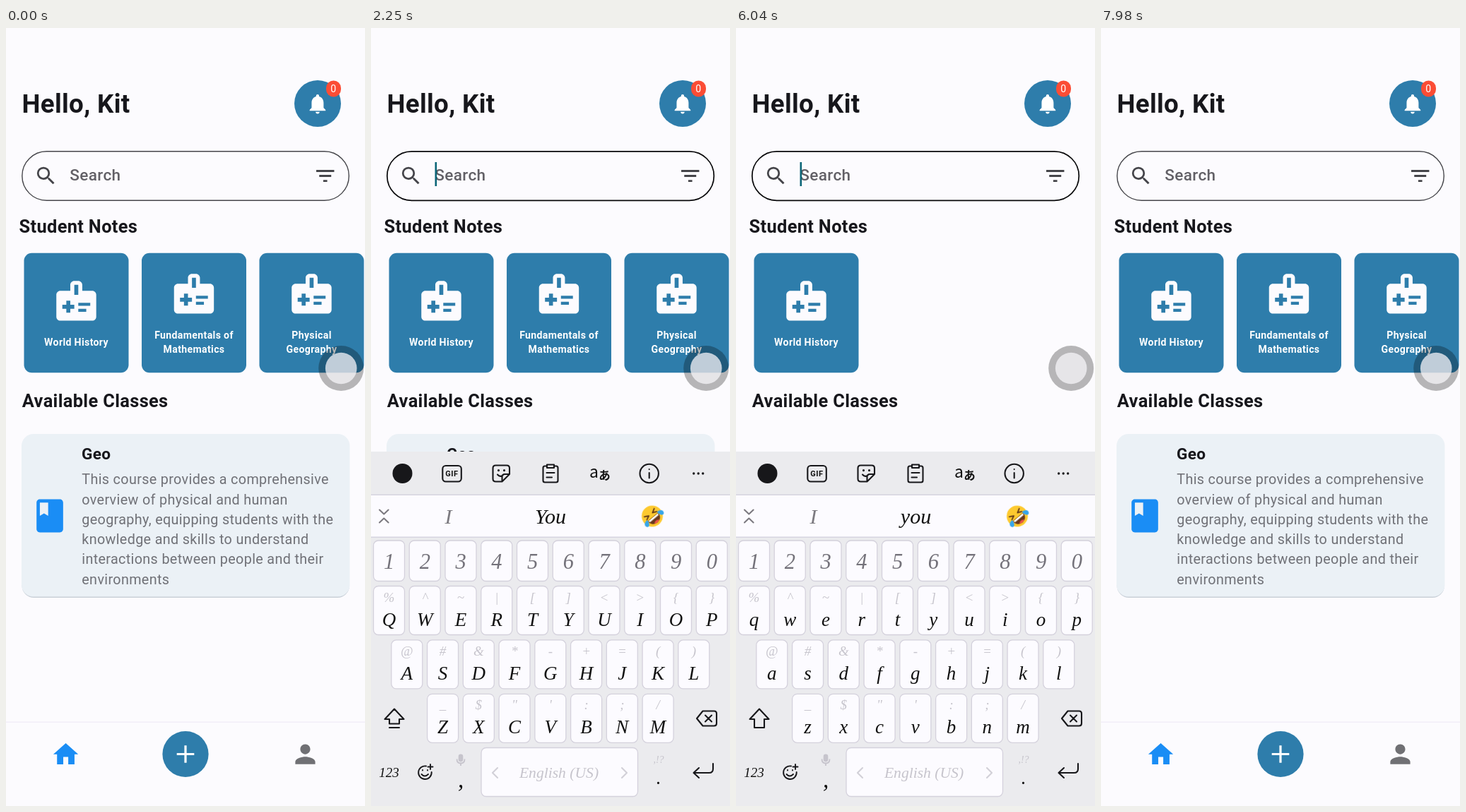
These frames come from a looping animation (508x1102 px, 8 s). An HTML page:

```html
<!DOCTYPE html>
<html lang="en">
<head>
<meta charset="utf-8">
<title>Class search</title>
<style>
html, body { margin: 0; width: 100%; height: 100%; overflow: hidden; background: #fcfbfe; }
svg { display: block; width: 100%; height: 100%; }
text { font-family: Roboto, sans-serif; letter-spacing: .35px; white-space: pre; }
.bold { font-weight: 700; fill: #17171c; }
.h2 { font-size: 25.4px; }
.input { font-size: 22.6px; }
.holder { font-weight: 500; fill: #626066; }
.label { font-size: 14.1px; font-weight: 700; fill: #fff; text-anchor: middle; }
.desc { font-size: 19.75px; fill: #707177; }
.kb text { font-family: "Liberation Serif", "Noto Serif", serif; font-style: italic; letter-spacing: 0; text-anchor: middle; fill: #111; }
.kb .num { font-size: 30.5px; fill: #74727a; }
.kb .key { font-size: 27px; }
.kb .hint { font-size: 19px; fill: #c6c4cc; }
.kb .sug { font-size: 30px; fill: #111; }
.kb .dim { fill: #7c7a80; }
.kb .glyph { font-family: "Noto Sans CJK JP", "Noto Sans CJK", "Noto Sans", sans-serif; font-style: normal; font-weight: 500; }
.line { fill: none; stroke: #17171a; stroke-width: 2.1; stroke-linecap: round; stroke-linejoin: round; }
.cap { fill: #fcfbff; stroke: #d4d1dc; stroke-width: 1.3; }

.steps { animation: 8s step-end infinite; }
.idle { animation-name: idle; }
.focus { animation-name: focus; }
.page { animation-name: page; }
.unfiltered { animation-name: unfiltered; }
.typed { animation-name: typed; }
.empty { animation-name: empty; }
.upper { animation-name: upper; }
.lower { animation-name: lower; }
.sug-low { animation-name: sugLow; }
.cover { animation-name: cover; }
.load { animation-name: load; }
.shift { animation-name: shift; }
.blink { animation: blink 1s -20ms step-end infinite; }
.kb { animation: slide 8s infinite, fade 8s infinite; }
.arc { transform-origin: 254px 512.5px; animation: turn 8s linear infinite, sweep 8s infinite; }

@keyframes idle { 0%, 77.4375% { opacity: 1 } 12.125% { opacity: 0 } 100% { opacity: 1 } }
@keyframes focus { 0%, 77.4375%, 100% { opacity: 0 } 12.125% { opacity: 1 } }
@keyframes page { 0%, 86%, 100% { opacity: 1 } 77.4375% { opacity: 0 } }
@keyframes load { 0%, 86%, 100% { opacity: 0 } 77.4375% { opacity: 1 } }
@keyframes unfiltered { 0%, 86%, 100% { opacity: 1 } 31.25% { opacity: 0 } }
@keyframes typed { 0%, 69.5%, 100% { opacity: 0 } 31.25% { opacity: 1 } }
@keyframes empty { 0%, 69.5%, 100% { opacity: 1 } 31.25% { opacity: 0 } }
@keyframes upper { 0%, 31.25%, 100% { opacity: 0 } 25.25% { opacity: 1 } }
@keyframes lower { 0%, 31.25%, 100% { opacity: 1 } 25.25% { opacity: 0 } }
@keyframes sugLow { 0%, 69.5%, 100% { opacity: 1 } 25.25% { opacity: 0 } }
@keyframes cover { 0%, 75.75%, 100% { opacity: 0 } 17.25% { opacity: 1 } }
@keyframes shift { 0%, 69.5%, 100% { transform: none } 31.25% { transform: translateX(21px) } }
@keyframes blink { 0%, 100% { opacity: 1 } 50% { opacity: 0 } }
@keyframes slide {
  0%, 78.25%, 100% { transform: translateY(107px) }
  17.25% { transform: translateY(107px); animation-timing-function: cubic-bezier(0, 0, .2, 1) }
  19.75% { transform: none }
  75.75% { transform: none; animation-timing-function: cubic-bezier(.4, 0, 1, 1) }
}
@keyframes fade {
  0%, 78.25%, 100% { opacity: 0 }
  17.25% { opacity: 0; animation-timing-function: linear }
  18.5% { opacity: 1 }
  75.75% { opacity: 1; animation-timing-function: cubic-bezier(.4, 0, 1, 1) }
}
@keyframes turn { 0%, 77.4375% { transform: rotate(-90deg) } 83.75%, 100% { transform: rotate(26deg) } }
@keyframes sweep {
  0%, 77.4375% { stroke-dasharray: .5 400; animation-timing-function: cubic-bezier(.45, 0, .4, 1) }
  83.75%, 100% { stroke-dasharray: 260 400 }
}
</style>
</head>
<body>
<svg viewBox="0 0 508 1102" preserveAspectRatio="none">
  <defs>
    <path id="badge" fill-rule="evenodd" d="M20 7h-5V4c0-1.1-.9-2-2-2h-2c-1.1 0-2 .9-2 2v3H4c-1.1 0-2 .9-2 2v11c0 1.1.9 2 2 2h16c1.1 0 2-.9 2-2V9c0-1.1-.9-2-2-2zm-9-3h2v5h-2V4zm0 12H9v2H7v-2H5v-2h2v-2h2v2h2v2zm2-1.5V13h6v1.5h-6zm0 3V16h4v1.5h-4z"/>
    <g id="rofl" transform="rotate(-40)">
      <circle r="15" fill="#fdc92f"/>
      <path d="M-9.5 1.5H9.5C9.5 8 5.5 11.5 0 11.5S-9.5 8-9.5 1.5z" fill="#6b3a1c"/>
      <path d="M-8.5 2H8.5L8 4.5H-8z" fill="#fff"/>
      <path d="M-4.5 10C-2 7.5 2 7.5 4.5 10 2 11.8-2 11.8-4.5 10z" fill="#f0524a"/>
      <path d="M-9-6.5L-3.5-3.5-9-1M9-6.5L3.5-3.5 9-1" fill="none" stroke="#5a3218" stroke-width="1.8" stroke-linecap="round" stroke-linejoin="round"/>
      <path d="M-9 0C-15-1-18 4-15.5 7S-9 6-9 0zM9 0C15-1 18 4 15.5 7S9 6 9 0z" fill="#36a5ea"/>
    </g>
  </defs>

  <rect width="508" height="1102" fill="#fcfbfe"/>

  <g class="steps page">
    <text class="bold" x="22.5" y="120" font-size="36.7">Hello, Kit</text>
    <circle cx="441" cy="107" r="33" fill="#2e7dab"/>
    <path fill="#fff" transform="translate(424 90.5) scale(1.411)" d="M12 22c1.1 0 2-.9 2-2h-4c0 1.1.89 2 2 2zm6-6v-5c0-3.07-1.64-5.64-4.5-6.32V4c0-.83-.67-1.5-1.5-1.5s-1.5.67-1.5 1.5v.68C7.63 5.36 6 7.92 6 11v5l-2 2v1h16v-1l-2-2z"/>
    <rect x="453" y="74.5" width="21" height="23" rx="10.5" fill="#fb4d35"/>
    <text x="463.5" y="91" font-size="14.1" fill="#fff" text-anchor="middle">0</text>

    <rect class="steps idle" x="22.8" y="174.8" width="462.5" height="69.5" rx="34.75" fill="none" stroke="#45454a" stroke-width="1.4"/>
    <rect class="steps focus" x="22.8" y="174.8" width="462.5" height="69.5" rx="34.75" fill="none" stroke="#08080a" stroke-width="1.7"/>
    <g fill="#45454a">
      <path transform="translate(39.6 192.4) scale(1.411)" d="M15.5 14h-.79l-.28-.27A6.471 6.471 0 0 0 16 9.5 6.5 6.5 0 1 0 9.5 16c1.61 0 3.09-.59 4.23-1.57l.27.28v.79l5 4.99L20.49 19l-4.99-5zm-6 0C7.01 14 5 11.99 5 9.5S7.01 5 9.5 5 14 7.01 14 9.5 11.99 14 9.5 14z"/>
      <path transform="translate(434.8 192.6) scale(1.411)" d="M10 18h4v-2h-4v2zM3 6v2h18V6H3zm3 7h12v-2H6v2z"/>
    </g>
    <text class="input holder steps empty" x="90.3" y="216.3">Search</text>
    <g class="steps typed">
      <text class="input" x="91" y="216.5" fill="#1d1d22">W</text>
      <rect x="91" y="218.5" width="20.5" height="1.5" fill="#1d1d22"/>
    </g>
    <g class="steps focus"><g class="steps shift"><rect class="blink" x="90.5" y="190" width="2.6" height="34" fill="#0a6577"/></g></g>

    <text class="bold h2" x="18.5" y="290">Student Notes</text>
    <g id="cards"></g>
    <text class="bold h2" x="22.8" y="537">Available Classes</text>

    <g class="steps unfiltered">
      <rect x="22.5" y="577" width="463.5" height="230" rx="17" fill="#c9d0d8"/>
      <rect x="22" y="575" width="464.5" height="230.5" rx="17" fill="#ebf1f6"/>
      <path fill="#1a8df5" fill-rule="evenodd" transform="translate(33.8 662.8) scale(2.352)" d="M18 2H6c-1.1 0-2 .9-2 2v16c0 1.1.9 2 2 2h12c1.1 0 2-.9 2-2V4c0-1.1-.9-2-2-2zM6 4h5v8l-2.5-1.5L6 12V4z"/>
      <text class="bold" x="107" y="611" font-size="22.6">Geo</text>
      <g id="desc"></g>
    </g>
  </g>

  <g class="steps load">
    <circle class="arc" cx="254" cy="512.5" r="25.2" pathLength="360" fill="none" stroke="#086377" stroke-width="5.6" stroke-linecap="square"/>
  </g>

  <rect class="steps cover" y="600" width="508" height="383" fill="#fcfbfe"/>

  <rect y="982.5" width="508" height="1.3" fill="#efecf7"/>
  <path fill="#1a8df5" transform="translate(63.4 1007.7) scale(1.764)" d="M10 20v-6h4v6h5v-8h3L12 3 2 12h3v8z"/>
  <circle cx="254" cy="1028.5" r="32.6" fill="#2e7dab"/>
  <path d="M241.7 1028.5h24.6M254 1016.2v24.6" stroke="#fff" stroke-width="3.2"/>
  <path fill="#707074" transform="translate(402.3 1007.5) scale(1.764)" d="M12 12c2.21 0 4-1.79 4-4s-1.79-4-4-4-4 1.79-4 4 1.79 4 4 4zm0 2c-2.67 0-8 1.34-8 4v2h16v-2c0-2.66-5.33-4-8-4z"/>

  <circle cx="474.2" cy="482" r="32" fill="#000" fill-opacity=".28"/>
  <circle cx="474.2" cy="482" r="22.3" fill="#f6f5f8" fill-opacity=".75"/>

  <g class="kb">
    <rect y="600" width="508" height="615" fill="#ebebee"/>
    <rect y="661" width="508" height="60" fill="#fcfbff"/>
    <path d="M0 661.2H508M0 721.2H508" stroke="#d6d4e0" stroke-width="1.4"/>

    <!-- toolbar -->
    <circle cx="44.5" cy="631" r="14" fill="#17171a"/>
    <rect class="line" x="101.3" y="620" width="26.5" height="22.5" rx="4.5"/>
    <text class="glyph" x="114.5" y="635.3" style="font-family:Roboto,sans-serif;font-size:11px;font-weight:700;letter-spacing:.6px">GIF</text>
    <path class="line" d="M176.5 619.5h15.5q4 0 4 4V632l-10.5 10.5h-9q-4 0-4-4v-15q0-4 4-4zM196 632h-6.5q-4 0-4 4v6.5M179 632.5q4 4.5 8 .5"/>
    <path class="line" style="stroke-width:3.2" d="M180.5 626.5v.1M188.5 626.5v.1"/>
    <path class="line" d="M249 620.5h-3q-2.5 0-2.5 2.5v18q0 2.5 2.5 2.5h16q2.5 0 2.5-2.5V623q0-2.5-2.5-2.5h-3M249 618.5h10v4.500h-10zM248.500 630h11M248.500 636.500h7.500"/>
    <text class="glyph" x="315.5" y="637" font-size="23">a</text>
    <text class="glyph" x="330.5" y="639.5" font-size="16.5" style="font-weight:700">あ</text>
    <circle class="line" cx="393.7" cy="631" r="13.2"/>
    <path class="line" d="M393.7 630v7.5M393.7 625v.1"/>
    <path class="line" style="stroke-width:3.4" d="M456.7 631v.1M463.2 631v.1M469.7 631v.1"/>

    <!-- suggestions -->
    <path class="line" style="stroke:#7c7a80" d="M12 682.5l6.3 6 6.3-6M12 700.5l6.3-6 6.3 6"/>
    <g class="steps empty">
      <text class="sug dim" x="109.5" y="702">I</text>
      <g transform="translate(398 691.5)"><use href="#rofl"/></g>
    </g>
    <text class="sug steps sug-low" x="254.5" y="702">you</text>
    <text class="sug steps upper" x="254" y="702">You</text>
    <g class="steps typed">
      <text class="sug dim" x="109" y="702">What</text>
      <text class="sug" x="253" y="702">W</text>
      <text class="sug dim" x="398" y="702">We</text>
    </g>

    <g id="keys"></g>

    <!-- function keys -->
    <path class="line steps lower" d="M33 964.5l-13.5 14.5h6.5v12h14v-12h6.5z"/>
    <path class="line steps upper" d="M33 964.5l-13.5 14.5h6.5v6.5h14v-6.500h6.500zM26 991h14"/>
    <path class="line" d="M469.500 967.500h16q3.500 0 3.500 3.500v14q0 3.500-3.500 3.500h-16l-8.500-10.500zM473 973.500l9 9M482 973.500l-9 9"/>
    <text x="25.5" y="1061" font-size="19">123</text>
    <path class="line" style="stroke-width:1.9" d="M78 1045.5a9.3 9.3 0 1 0 7.7 8.5M71.5 1057q4.5 5 9.5 0M73 1051v.6M80 1051v.6M84 1043v7M80.5 1046.5h7"/>
    <g fill="none" stroke="#c6c4cc" stroke-width="1.8">
      <rect x="124.6" y="1029.5" width="4.8" height="9" rx="2.4" fill="#c6c4cc"/>
      <path d="M121.5 1035.5q0 6 5.5 6t5.5-6M127 1041.5v3.5"/>
    </g>
    <text class="key" x="127" y="1076" style="font-size:33px">,</text>
    <text class="hint" x="407" y="1041" style="font-size:14px">,!?</text>
    <text class="key" x="407" y="1071">.</text>
    <path class="line" d="M484 1042v7.500q0 5.500-5.500 5.500H457M464 1048l-7.500 7 7.500 7"/>
    <rect class="cap" x="156" y="1019.5" width="221.5" height="69" rx="7"/>
    <text class="hint" x="266" y="1062" style="font-size:21.6px">English (US)</text>
    <path class="line" style="stroke:#d2d0d8" d="M179 1048l-7 7 7 7M355 1048l7 7-7 7"/>
  </g>
</svg>
<script>
const $ = id => document.getElementById(id);
const esc = s => s.replace(/&/g, '&amp;').replace(/</g, '&lt;');
const text = (cls, x, y, s) => `<text class="${cls}" x="${x}" y="${y}">${esc(s)}</text>`;

const notes = [['World History'], ['Fundamentals of', 'Mathematics'], ['Physical', 'Geography']];
$('cards').innerHTML = notes.map((lines, i) => {
  const x = 25.5 + i * 166.5, mid = x + 74, up = (lines.length - 1) * 10;
  return `<g class="${i ? 'steps unfiltered' : ''}">
    <rect x="${x}" y="318.7" width="148" height="169.5" rx="11" fill="#2e7dab"/>
    <use href="#badge" fill="#fcfbfe" transform="translate(${mid - 33.9} ${352.5 - up}) scale(2.822)"/>
    ${lines.map((s, n) => text('label', mid, 450 - up + n * 20, s)).join('')}</g>`;
}).join('');

$('desc').innerHTML = [
  'This course provides a comprehensive',
  'overview of physical and human',
  'geography, equipping students with the',
  'knowledge and skills to understand',
  'interactions between people and their',
  'environments'
].map((s, i) => text('desc', 107.3, 646.3 + i * 28.25, s)).join('');

const pitch = 50.75;
const cap = (x, y, h) => `<rect class="cap" x="${x - 22}" y="${y}" width="44" height="${h}" rx="7"/>`;
const rows = [
  ['qwertyuiop', '%^~|[]<>{}', 25.5],
  ['asdfghjkl', '@#&*-+=()', 50.8],
  ['zxcvbnm', '_$"\':;/', 101.6]
];
let keys = [...'1234567890'].map((s, i) => {
  const x = 25.5 + i * pitch;
  return cap(x, 726, 57.5) + text('num', x, 765.5, s);
}).join('');
rows.forEach(([letters, hints, left], r) => {
  const y = 790.5 + r * 76.4;
  [...letters].forEach((s, i) => {
    const x = left + i * pitch;
    keys += cap(x, y, 69) + text('hint', x, y + 22, hints[i]) +
      text('key steps lower', x, y + 56, s) +
      text('key steps upper', x, y + 56, s.toUpperCase());
  });
});
$('keys').innerHTML = keys;
</script>
</body>
</html>
```
